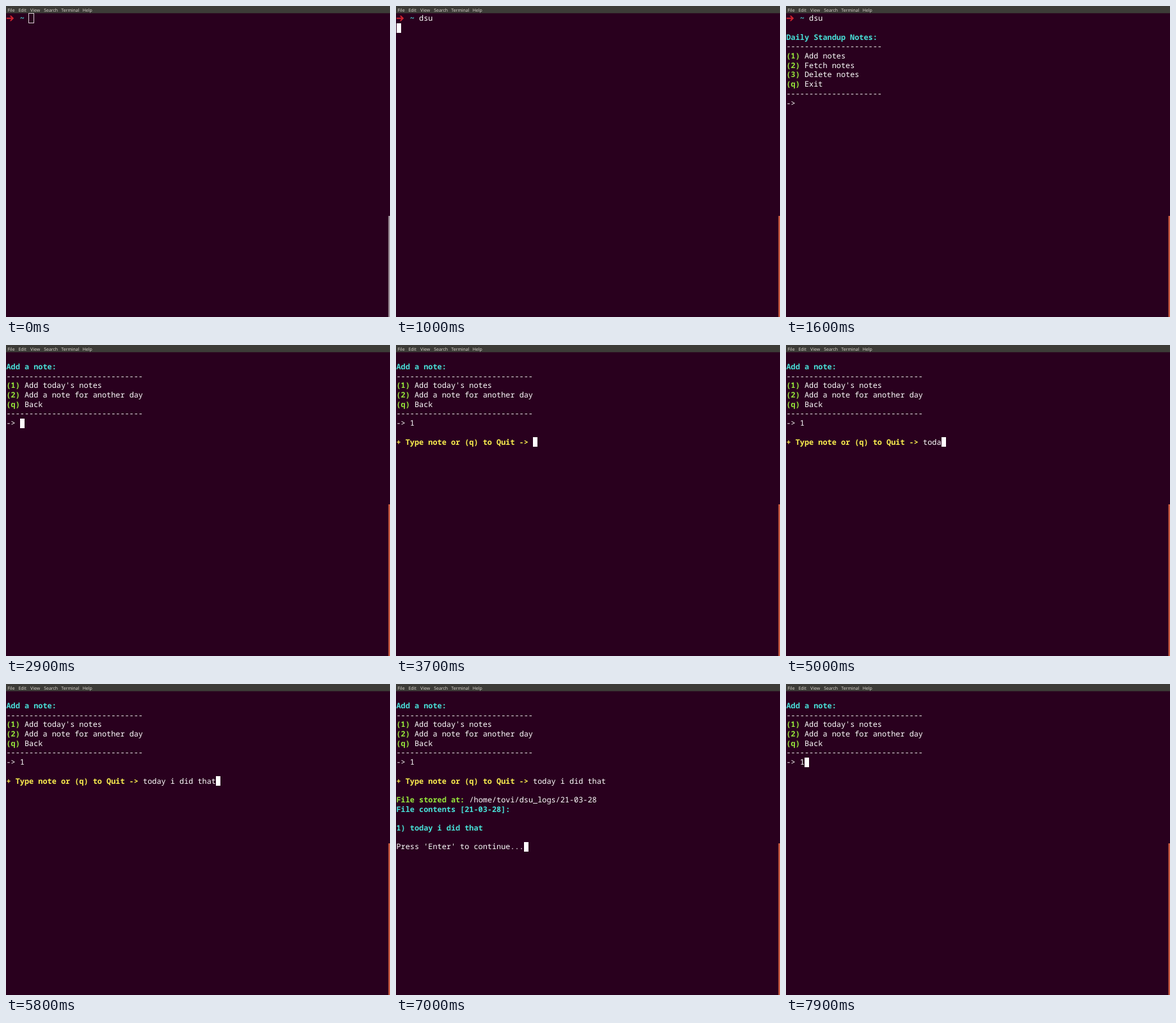
These frames come from a looping animation (600 by 486 pixels, 8000 ms). An HTML page with a canvas:

```html
<!DOCTYPE html>
<html lang="en">
<head>
<meta charset="utf-8">
<title>Standup notes terminal</title>
<style>
html, body { margin: 0; width: 100%; height: 100%; overflow: hidden; background: #29001e; }
canvas { display: block; }
</style>
</head>
<body>
<canvas id="stage" width="600" height="486"></canvas>
<script>
const ctx = document.getElementById('stage').getContext('2d');
ctx.textRendering = 'geometricPrecision';

const LOOP = 8000, BLINK = 600;
const LEFT = 0.5, TOP = 12, CELL = 7.12, ROW = 14.69;
const MONO = '11.87px "Noto Sans Mono", monospace';
const WHITE = '#fff', CYAN = '#48e2da', GREEN = '#98ea3c', YELLOW = '#fdf04f';

// Key press times in ms
const FOCUS = 300, RUN = 960, READY = 1220, PICK_ADD = 2450, OPEN_ADD = 2850,
      PICK_TODAY = 3250, OPEN_NOTE = 3560, SAVE = 6410, CONTINUE = 7400, PICK_AGAIN = 7840;
const command = 'dsu', note = 'today i did that';
const commandKeys = [...command].map((_, i) => 480 + i * 160);
const noteKeys = [...note].map((_, i) => i < 4 ? 4580 + i * 130 : 5060 + (i - 4) * 64);
const keys = [FOCUS, ...commandKeys, RUN, PICK_ADD, OPEN_ADD, PICK_TODAY, OPEN_NOTE,
              ...noteKeys, SAVE, CONTINUE, PICK_AGAIN];

const typed = (text, times, t) => text.slice(0, times.filter(k => k <= t).length);

function write(row, col, text, color = WHITE) {
  ctx.font = (color === WHITE ? '' : 'bold ') + MONO;
  ctx.fillStyle = color;
  ctx.fillText(text, LEFT + col * CELL, TOP + row * ROW + 11.3);
  return [row, col + text.length];
}

function menu(row, title, width, options, answer) {
  write(row, 0, title, CYAN);
  write(row + 1, 0, '-'.repeat(width));
  options.forEach(([key, label], i) => {
    write(row + 2 + i, 0, `(${key})`, GREEN);
    write(row + 2 + i, 4, label);
  });
  const end = row + 2 + options.length;
  write(end, 0, '-'.repeat(width));
  return write(end + 1, 0, '-> ' + answer);
}

function shell(t) {
  ctx.fillStyle = ctx.strokeStyle = '#d3232f';
  ctx.lineWidth = 2;
  ctx.beginPath();
  ctx.moveTo(1, 19.3);
  ctx.lineTo(9, 19.3);
  ctx.stroke();
  ctx.beginPath();
  [[6, 15], [8, 15], [12.3, 19.3], [8, 23.6], [6, 23.6], [9, 19.3]].forEach(p => ctx.lineTo(...p));
  ctx.fill();
  write(0, 3, '~', CYAN);
  const caret = write(0, 5, typed(command, commandKeys, t));
  if (t < RUN) return caret;
  if (t < READY) return [1, 0];
  return menu(2, 'Daily Standup Notes:', 21,
    [['1', 'Add notes'], ['2', 'Fetch notes'], ['3', 'Delete notes'], ['q', 'Exit']],
    t < PICK_ADD ? '' : '1');
}

function addNote(t) {
  const picked = t >= PICK_AGAIN || (t >= PICK_TODAY && t < CONTINUE);
  const caret = menu(1, 'Add a note:', 30,
    [['1', "Add today's notes"], ['2', 'Add a note for another day'], ['q', 'Back']],
    picked ? '1' : '');
  if (t < OPEN_NOTE || t >= CONTINUE) return caret;
  write(9, 0, '+ Type note or (q) to Quit ->', YELLOW);
  const noteEnd = write(9, 30, typed(note, noteKeys, t));
  if (t < SAVE) return noteEnd;
  write(11, 0, 'File stored at:', GREEN);
  write(11, 16, '/home/tovi/dsu_logs/21-03-28');
  write(12, 0, 'File contents [21-03-28]:', CYAN);
  write(14, 0, '1) ' + note, CYAN);
  return write(16, 0, "Press 'Enter' to continue...");
}

function cursor([row, col], t) {
  const x = Math.round(LEFT + col * CELL), y = Math.round(TOP + row * ROW);
  if (t < FOCUS) {
    ctx.strokeStyle = '#d8ccd4';
    ctx.lineWidth = 1;
    ctx.strokeRect(x - 0.5, y - 0.5, 8, 15);
    return;
  }
  const lastKey = Math.max(...keys.filter(k => k <= t));
  if ((t - lastKey) % (2 * BLINK) < BLINK) {
    ctx.fillStyle = WHITE;
    ctx.fillRect(x, y, 7, 15);
  }
}

function chrome(t) {
  ctx.fillStyle = '#3c3b37';
  ctx.fillRect(0, 0, 600, 11.3);
  ctx.fillStyle = '#d6d2ca';
  ctx.font = '6.9px "Noto Sans", sans-serif';
  [['File', 2.5], ['Edit', 19.5], ['View', 38], ['Search', 59.3], ['Terminal', 86.3], ['Help', 119.7]]
    .forEach(([label, x]) => ctx.fillText(label, x, 8.5));
  const thumb = t < OPEN_ADD ? 328 : 249;
  ctx.fillStyle = t < FOCUS ? '#a69aa2' : '#cb5a41';
  ctx.fillRect(597.5, thumb, 2.5, 486 - thumb);
}

function draw(now) {
  const t = now % LOOP;
  ctx.fillStyle = '#29001e';
  ctx.fillRect(0, 0, 600, 486);
  chrome(t);
  cursor(t < OPEN_ADD ? shell(t) : addNote(t), t);
  requestAnimationFrame(draw);
}

const start = performance.now();
const tick = () => draw(Math.max(0, performance.now() - start));
draw = (paint => () => {
  paint(performance.now() - start);
})(draw);
tick();
</script>
</body>
</html>
```
